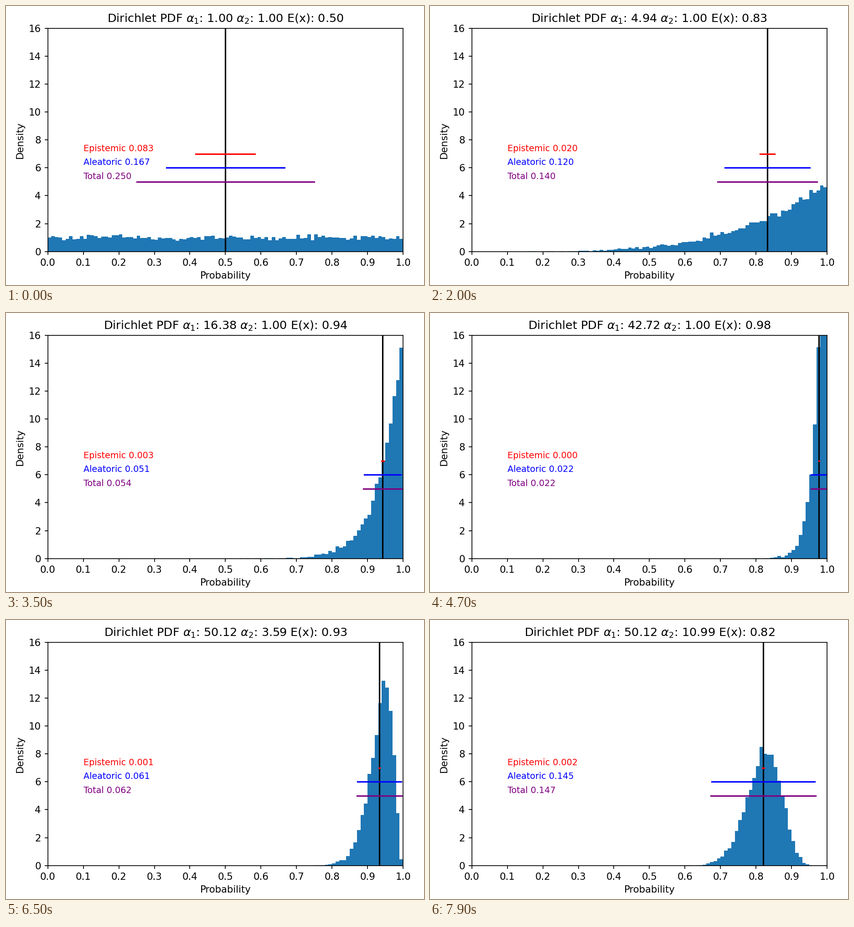
These frames come from a looping animation (917x611 px, 8000 ms). A matplotlib script:

```python
import matplotlib.pyplot as plt
import numpy as np
from matplotlib.animation import FuncAnimation

DPI = 917 / 6
FRAMES, INTERVAL = 80, 100
SAMPLES, BINS = 10_000, 100
ALPHAS = np.logspace(0, 1.7, 50)
LAST = len(ALPHAS) - 1

plt.rcParams["font.family"] = "DejaVu Sans"
fig, ax = plt.subplots(figsize=(917.01 / DPI, 611.01 / DPI), dpi=DPI)
fig.subplots_adjust(left=0.1, right=0.95, bottom=0.12, top=0.92)
ax.set(xlim=(0, 1), ylim=(0, 16), xlabel="Probability", ylabel="Density",
       xticks=np.arange(11) / 10, yticks=range(0, 17, 2))
title = ax.set_title("")

edges = np.linspace(0, 1, BINS + 1)
bars = ax.bar(edges[:-1], np.zeros(BINS), width=1 / BINS, align="edge",
              color="tab:blue")
mean_line = ax.axvline(0.5, color="black")


def make_spread(name, y, color):
    line, = ax.plot([], [], color=color)
    label = ax.text(0.1, y + 0.2, "", color=color, fontsize=9)
    return name, y, line, label


spreads = [make_spread("Epistemic", 7, "red"),
           make_spread("Aleatoric", 6, "blue"),
           make_spread("Total", 5, "purple")]


def update(frame):
    # First alpha 1 grows to its limit, then alpha 2 follows the same curve.
    a = ALPHAS[min(frame, LAST)]
    b = ALPHAS[max(frame - LAST, 0)]
    mean = a / (a + b)
    total = mean * (1 - mean)
    epistemic = total / (a + b + 1)

    draws = np.random.default_rng(frame).beta(a, b, SAMPLES)
    density, _ = np.histogram(draws, bins=edges, density=True)
    for bar, height in zip(bars, density):
        bar.set_height(height)

    mean_line.set_xdata([mean, mean])
    values = epistemic, total - epistemic, total
    for (name, y, line, label), value in zip(spreads, values):
        line.set_data([mean - value, mean + value], [y, y])
        label.set_text(f"{name} {value:.3f}")
    title.set_text(rf"Dirichlet PDF $\alpha_1$: {a:.2f} $\alpha_2$: {b:.2f} "
                   f"E(x): {mean:.2f}")


anim = FuncAnimation(fig, update, frames=FRAMES, interval=INTERVAL,
                     init_func=lambda: None, repeat=True)
plt.show()
```
